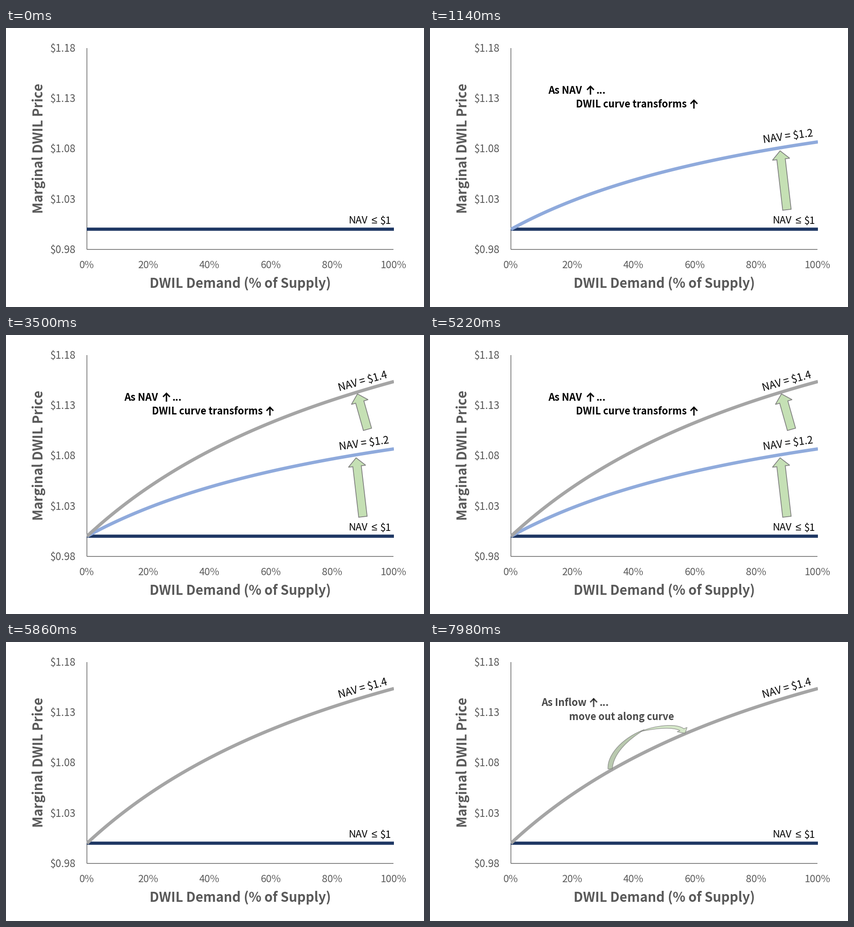
Recreate the animation shown at these times as a matplotlib script. Size 917 by 611 pixels, loop 8 s.

```python
import numpy as np
import matplotlib.pyplot as plt
from matplotlib.animation import FuncAnimation
from matplotlib.patches import PathPatch, Polygon, Rectangle
from matplotlib.path import Path

W, H, DPI = 917, 611, 100
STEP_MS, LOOP_MS = 20, 8000
FADE_STEPS, FADE_STEP_MS = 17, 40

GREY, NAVY, BLUE, SILVER = "#595959", "#1f3864", "#8faadc", "#a5a5a5"
GREEN, DARK_GREEN, EDGE = "#c5e0b4", "#9eb490", "#7f7f7f"
X0, X1, Y_TOP, Y_BASE, Y_NAV = 177.5, 850, 44, 484.9, 440.6

plt.rcParams["font.family"] = "Noto Sans CJK JP"
fig = plt.figure(figsize=(W / DPI, H / DPI), dpi=DPI, facecolor="white")
ax = fig.add_axes([0, 0, 1, 1])
ax.set_xlim(0, W)
ax.set_ylim(H, 0)
ax.axis("off")


def pt(px):
    return px * 72 / DPI


def text(x, y, s, size=22, color="black", ha="left", bold=False, angle=0, **kw):
    return ax.text(x, y, s, fontsize=pt(size), color=color, ha=ha, va="baseline",
                   weight="bold" if bold else "normal", rotation=angle,
                   rotation_mode="anchor", parse_math=False, **kw)


def line(xs, ys, color, width, z=2):
    art, = ax.plot(xs, ys, color=color, lw=pt(width), zorder=z, snap=False,
                   solid_capstyle="butt", solid_joinstyle="miter")
    return art


def curve(rise, bend, color, z):
    """Price curve that climbs by `rise` pixels and flattens with `bend`."""
    t = np.linspace(0, 1, 120)
    y = Y_NAV - rise * t * (1 + bend) / (1 + bend * t)
    art = line(X0 + t * (X1 + 1 - X0), y + 0.3, color, 7.2, z)
    art.set_clip_path(Rectangle((X0 - 0.5, 0), X1 + 1 - X0, H, transform=ax.transData))
    return art


def block_arrow(tail, tip):
    tail, tip = np.array(tail), np.array(tip)
    u = (tip - tail) / np.hypot(*(tip - tail))
    p = np.array([-u[1], u[0]])
    neck = tip - 18.5 * u
    pts = [tip, neck + 19 * p, neck + 9.3 * p, tail + 9.3 * p,
           tail - 9.3 * p, neck - 9.3 * p, neck - 19 * p]
    return ax.add_patch(Polygon(pts, fc=GREEN, ec=EDGE, lw=pt(1.7), zorder=5))


def small_arrow(x, y):
    """Upward arrow used inside the bold notes."""
    return [line([x, x], [y + 1.5, y + 20], "black", 3),
            line([x - 7.5, x, x + 7.5], [y + 9.5, y + 1.8, y + 9.5], "black", 3)]


def note(x, y, first, arrow_x, second):
    return [text(x, y, first, 22, bold=True),
            text(arrow_x + 12.5, y, "...", 22, bold=True),
            text(x + 61, y + 30.5, second, 21.6, bold=True),
            *small_arrow(arrow_x, y - 17.5)]


def shape(start, *parts, fc):
    """Closed outline; a part of one point is a line, of three a cubic."""
    pts, codes = [start], [Path.MOVETO]
    for part in parts:
        pts += part
        codes += [Path.LINETO if len(part) == 1 else Path.CURVE4] * len(part)
    path = Path(pts + [start], codes + [Path.CLOSEPOLY])
    return ax.add_patch(PathPatch(path, fc=fc, ec=EDGE, lw=pt(1.5), zorder=6))


# Axes and titles
line([X0, X0], [Y_TOP, Y_BASE], GREY, 1.4)
line([X0, X1], [Y_BASE, Y_BASE], GREY, 1.4)
for i in range(5):
    text(153, 52 + i * 110.2, f"${1.18 - 0.05 * i:.2f}", 22.5, GREY, "right")
for i in range(6):
    text(177 + i * 134.6, 525.5, f"{20 * i}%", 22, GREY, "center")
text(514, 569, "DWIL Demand (% of Supply)", 29, GREY, "center", True)
text(81, 264, "Marginal DWIL Price", 29, GREY, "center", True, 90)

line([X0 - 0.5, X1 + 1], [Y_NAV, Y_NAV], NAVY, 7, 3)
text(752, 428.5, "NAV")
text(807.5, 428.5, "≤", 23, ha="center", family="Liberation Sans")
text(845, 428.5, "$1", ha="right")

# Parts that fade
rise_note = (note(259, 143.5, "As NAV", 352, "DWIL curve transforms")
             + small_arrow(579, 156.5))
mid = [curve(191.5, 0.935, BLUE, 3.5),
       text(731.5, 252, "NAV = $1.2", 22.8, angle=7.8),
       block_arrow((783, 398), (768, 269))]
high = [curve(339, 0.85, SILVER, 4),
        text(731, 123, "NAV = $1.4", 22.8, angle=15.5)]
high_arrow = [block_arrow((793, 206.6), (771, 129))]
flow = note(244, 140, "As Inflow", 359, "move out along curve") + [
    shape((390.5, 278), [(388, 246), (425, 208), (470, 192)],
          [(436, 213), (402, 243), (400, 278)], fc=DARK_GREEN),
    shape((462, 196), [(492, 183), (540, 177), (557, 190)], [(564, 187)],
          [(559.5, 200)], [(542, 196.5)], [(548.5, 194)],
          [(533, 186), (500, 188), (462, 196)], fc=GREEN)]


def fade(ms, start):
    """Eased progress of a stepped fade that begins at `start`."""
    if ms < start:
        return 0.0
    t = min(1, ((ms - start) // FADE_STEP_MS + 1) / FADE_STEPS)
    return t * t * (3 - 2 * t)


def set_alpha(parts, a):
    for part in parts:
        part.set_alpha(a)
        part.set_visible(a > 0)


def update(i):
    ms = i * STEP_MS
    gone = 1 - fade(ms, 5220)
    set_alpha(mid + rise_note, fade(ms, 500) * gone)
    set_alpha(high, fade(ms, 2860))
    set_alpha(high_arrow, fade(ms, 2860) * gone)
    set_alpha(flow, fade(ms, 7580))
    return []


anim = FuncAnimation(fig, update, frames=LOOP_MS // STEP_MS, interval=STEP_MS,
                     init_func=lambda: update(0), repeat=True, repeat_delay=0)
plt.show()
```
